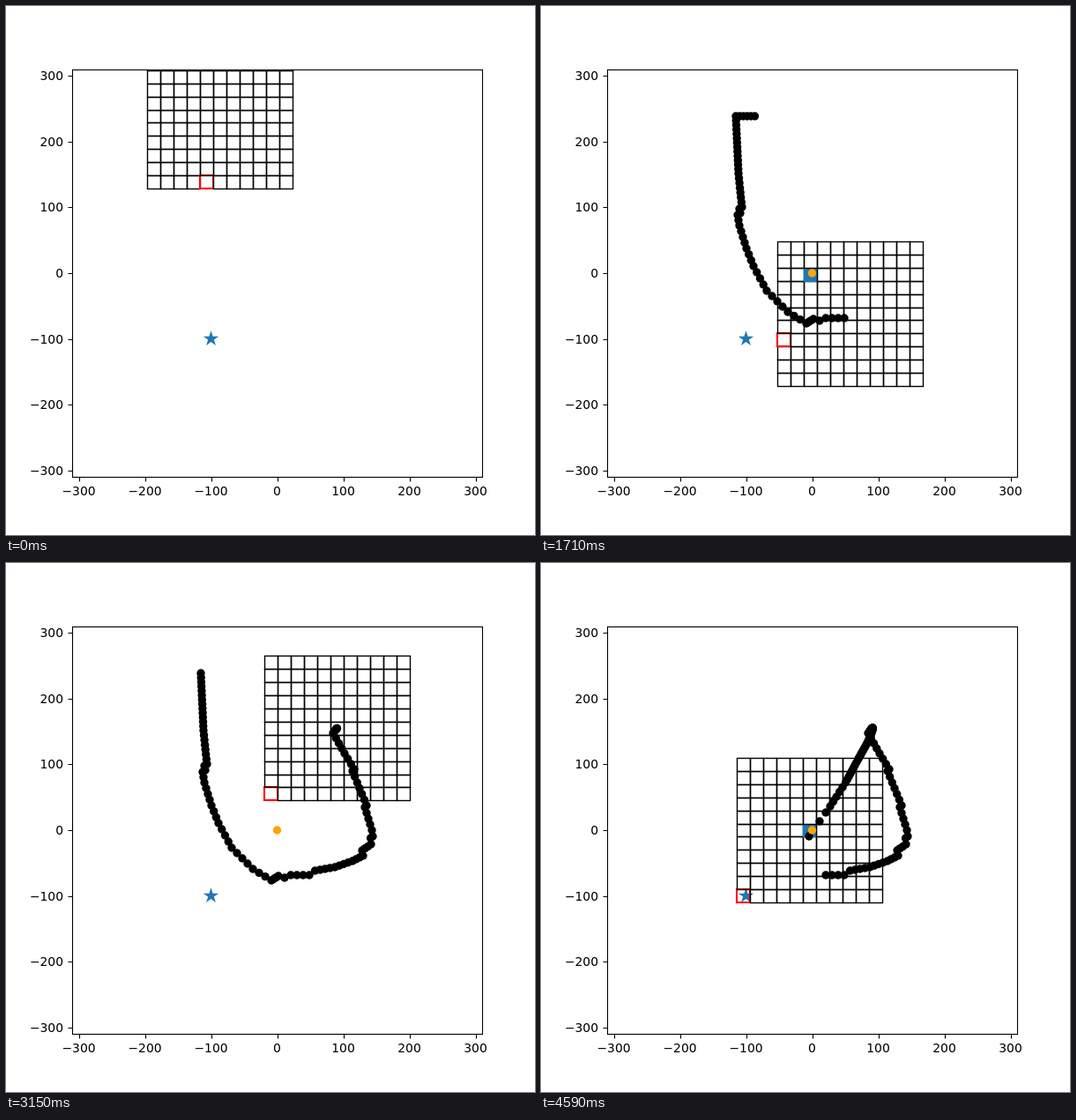
These frames come from a looping animation (600 px wide and 600 px high, 4620 ms). An HTML page with a canvas:

```html
<!DOCTYPE html>
<html>
<head>
<meta charset="utf-8">
<style>
  html, body { margin: 0; width: 100%; height: 100%; overflow: hidden; background: #fff; }
  canvas { display: block; }
</style>
</head>
<body>
<canvas id="stage" width="600" height="600"></canvas>
<script>
const ctx = document.getElementById('stage').getContext('2d');
const STEP = 30, STEPS = 154, TRAIL = 100, CELLS = 11;
const BLUE = '#1f77b4';
const box = { x: 75, y: 72, w: 465, h: 462 };
const scaleX = box.w / 620, scaleY = box.h / 620;
const cellW = 20 * scaleX, cellH = 20 * scaleY;
const px = x => 307.5 + x * scaleX;
const py = y => 303 - y * scaleY;
const origin = [px(0), py(0)], goal = [px(-100), py(-100)];

// Grid centre: step, x, y
const keys = [
  [0, 242.5, 125], [5, 221, 125], [18, 224, 190], [23, 226.7, 217], [25, 228, 228],
  [26, 225, 230], [27, 226, 235], [28, 223, 237], [30, 225, 249], [34, 233, 275],
  [37, 241, 295], [41, 256, 323], [45, 280, 347], [48, 301, 360], [51, 309, 355],
  [52, 316, 357], [53, 323, 354], [56, 344, 354], [57, 350.5, 349], [61, 373, 345],
  [65, 393, 338], [68, 405, 332], [69, 404, 326], [72, 414, 319], [73, 413.5, 312],
  [74, 416, 310], [75, 415, 303], [79, 407, 277], [80, 409, 275], [86, 393, 236],
  [87, 395, 234], [90, 384, 216], [94, 371, 193], [96, 373.7, 189.5], [104, 375.4, 187.5],
  [110, 376.3, 187], [117, 375.5, 191], [126, 371.5, 201.5], [136, 359.5, 223], [144, 345.5, 249],
  [149, 328, 276], [150, 323, 283], [151, 316, 293], [152, 304, 310], [153, 304.5, 303]
];

function centre(step) {
  const i = Math.max(1, keys.findIndex(k => k[0] >= step));
  const [s0, x0, y0] = keys[i - 1], [s1, x1, y1] = keys[i];
  const u = (step - s0) / (s1 - s0);
  return [x0 + (x1 - x0) * u, y0 + (y1 - y0) * u];
}
const path = Array.from({ length: STEPS }, (_, s) => centre(s));

function dot([x, y], color) {
  ctx.fillStyle = color;
  ctx.beginPath();
  ctx.arc(x, y, 4.7, 0, 2 * Math.PI);
  ctx.fill();
}

function star([x, y], radius) {
  ctx.fillStyle = BLUE;
  ctx.beginPath();
  for (let i = 0; i < 10; i++) {
    const r = i % 2 ? radius * 0.382 : radius, a = i * Math.PI / 5;
    ctx.lineTo(x + r * Math.sin(a), y - r * Math.cos(a));
  }
  ctx.fill();
}

// Edges snap to whole pixels, odd widths to pixel centres
function cell(x, y, color, width, fill) {
  const shift = Math.round(width) % 2 / 2;
  const left = Math.round(x) + shift, top = Math.round(y) + shift;
  const w = Math.round(x + cellW) + shift - left, h = Math.round(y + cellH) + shift - top;
  if (fill) {
    ctx.fillStyle = fill;
    ctx.fillRect(left, top, w, h);
  }
  ctx.strokeStyle = color;
  ctx.lineWidth = width;
  ctx.strokeRect(left, top, w, h);
}

function grid([cx, cy]) {
  const left = cx - cellW * CELLS / 2, bottom = cy + cellH * CELLS / 2;
  const locate = ([x, y]) => [Math.floor((x - left) / cellW), Math.floor((bottom - y) / cellH)];
  const clamp = n => Math.min(CELLS - 1, Math.max(0, n));
  const home = locate(origin), near = locate(goal).map(clamp);
  const at = (c, r, p) => c === p[0] && r === p[1];
  for (let c = 0; c < CELLS; c++) {
    for (let r = 0; r < CELLS; r++) {
      const x = left + c * cellW, y = bottom - (r + 1) * cellH;
      if (at(c, r, near)) cell(x, y, '#f00', 2.08);
      else if (at(c, r, home)) cell(x, y, BLUE, 1.39, BLUE);
      else cell(x, y, '#000', 1.39);
    }
  }
}

function axes() {
  ctx.strokeStyle = ctx.fillStyle = '#000';
  ctx.lineWidth = 1.11;
  ctx.font = '13.89px "DejaVu Sans", sans-serif';
  ctx.strokeRect(box.x + 0.5, box.y + 0.5, box.w, box.h);
  ctx.beginPath();
  for (let v = -300; v <= 300; v += 100) {
    const label = String(v).replace('-', '\u2212');
    const x = Math.round(px(v)) + 0.5, y = Math.round(py(v)) + 0.5;
    ctx.moveTo(x, 534.5);
    ctx.lineTo(x, 539.5);
    ctx.moveTo(75.5, y);
    ctx.lineTo(70.5, y);
    ctx.textAlign = 'center';
    ctx.fillText(label, px(v), 555);
    ctx.textAlign = 'right';
    ctx.fillText(label, 65, Math.round(py(v) + 5));
  }
  ctx.stroke();
}

function draw(step) {
  ctx.fillStyle = '#fff';
  ctx.fillRect(0, 0, 600, 600);
  ctx.save();
  ctx.beginPath();
  ctx.rect(box.x, box.y, box.w, box.h);
  ctx.clip();
  star(goal, 9.2);
  grid(path[step]);
  path.slice(Math.max(0, step - TRAIL), step).forEach(p => dot(p, '#000'));
  if (step > 0) dot(origin, '#ffa500');
  ctx.restore();
  axes();
}

const start = performance.now();
function tick() {
  draw(Math.floor((performance.now() - start) / STEP) % STEPS);
  requestAnimationFrame(tick);
}
tick();
</script>
</body>
</html>
```
